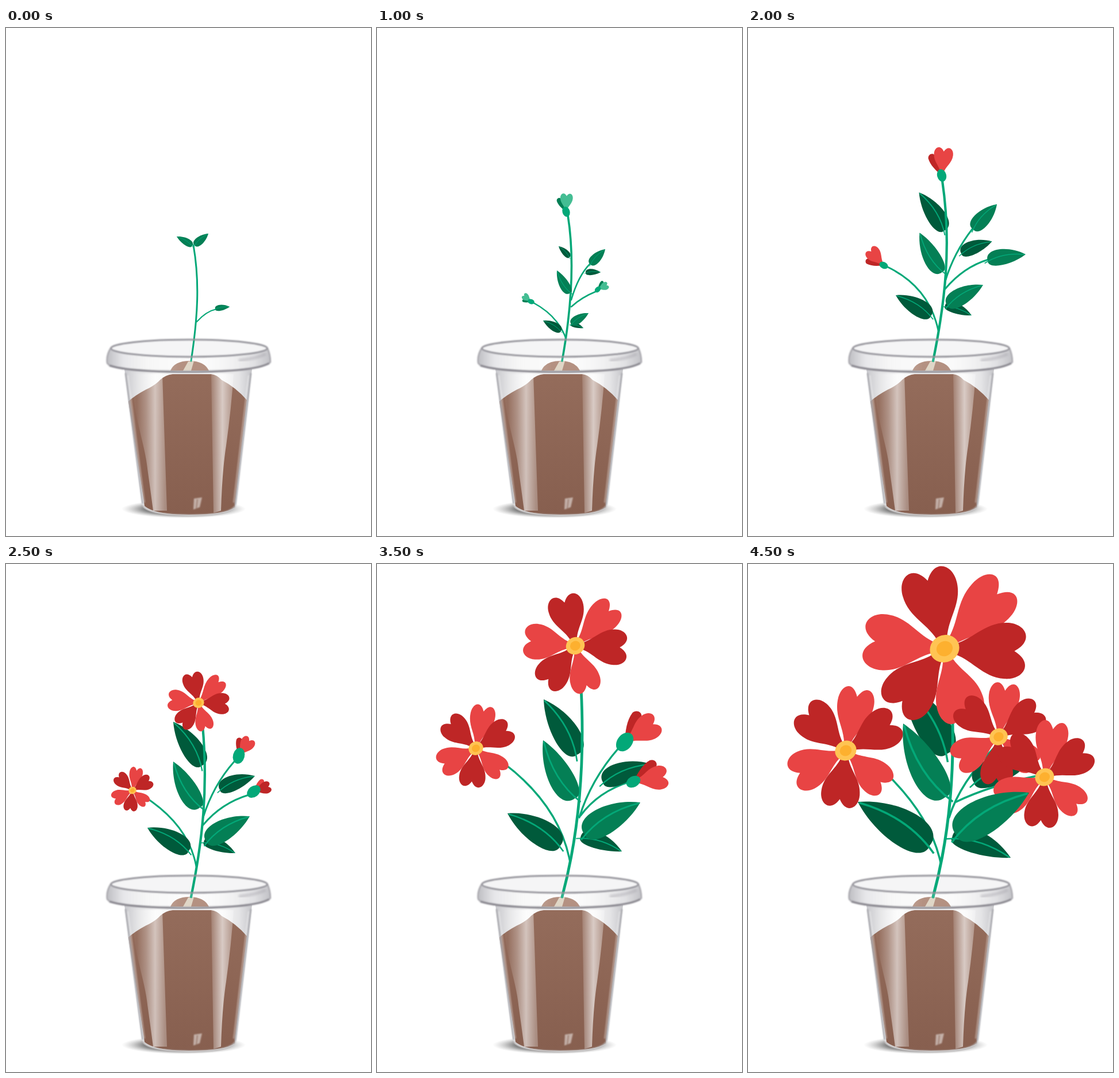
An HTML page that plays this animation: 635 px wide and 882 px high, repeating every 5 s.

```html
<!DOCTYPE html>
<html lang="en">
<head>
<meta charset="utf-8">
<title>Growing flower</title>
<style>
  html, body { margin: 0; width: 100%; height: 100%; overflow: hidden; background: #fff; }
  svg { display: block; width: 100%; height: 100%; }
</style>
</head>
<body>
<svg viewBox="0 0 635 882">
  <defs>
    <filter id="soft"><feGaussianBlur stdDeviation=".8"/></filter>
    <filter id="softer"><feGaussianBlur stdDeviation="2"/></filter>
    <radialGradient id="shadow">
      <stop offset=".6" stop-color="#444" stop-opacity=".75"/>
      <stop offset=".8" stop-color="#666" stop-opacity=".35"/>
      <stop offset="1" stop-color="#999" stop-opacity="0"/>
    </radialGradient>
    <linearGradient id="wall">
      <stop offset="0" stop-color="#c9c9cd"/>
      <stop offset=".1" stop-color="#e2e2e4"/>
      <stop offset=".25" stop-color="#f8f8f8"/>
      <stop offset=".75" stop-color="#f8f8f8"/>
      <stop offset=".9" stop-color="#e4e4e6"/>
      <stop offset="1" stop-color="#c6c6ca"/>
    </linearGradient>
    <linearGradient id="soil" x2="0" y2="1">
      <stop offset="0" stop-color="#946c5b"/>
      <stop offset="1" stop-color="#875f4f"/>
    </linearGradient>
    <linearGradient id="shineL" gradientUnits="userSpaceOnUse" x1="222" x2="277" y1="0" y2="0">
      <stop offset=".1" stop-color="#fff" stop-opacity=".04"/>
      <stop offset=".4" stop-color="#fff" stop-opacity=".28"/>
      <stop offset=".68" stop-color="#fff" stop-opacity=".6"/>
      <stop offset="1" stop-color="#fff" stop-opacity=".28"/>
    </linearGradient>
    <linearGradient id="shineR" gradientUnits="userSpaceOnUse" x1="356" x2="397" y1="0" y2="0">
      <stop offset="0" stop-color="#fff" stop-opacity=".12"/>
      <stop offset=".5" stop-color="#fff" stop-opacity=".65"/>
      <stop offset="1" stop-color="#fff" stop-opacity=".25"/>
    </linearGradient>
    <linearGradient id="band">
      <stop offset="0" stop-color="#a8a8ae" stop-opacity=".75"/>
      <stop offset=".1" stop-color="#dcdce0" stop-opacity=".7"/>
      <stop offset=".25" stop-color="#eee" stop-opacity=".5"/>
      <stop offset=".45" stop-color="#eee" stop-opacity=".18"/>
      <stop offset=".6" stop-color="#eee" stop-opacity=".18"/>
      <stop offset=".9" stop-color="#d4d4d8" stop-opacity=".7"/>
      <stop offset="1" stop-color="#acacb2" stop-opacity=".75"/>
    </linearGradient>
  </defs>

  <ellipse cx="309" cy="835" rx="108" ry="16" fill="url(#shadow)"/>
  <path d="M206 592L236 826Q239 846 318 847Q398 846 400 828L428 592Z" fill="url(#wall)"/>
  <path d="M213 648Q226 637 243 628Q260 620 268 611Q278 602 290 601H357Q367 602 375 611Q400 624 419 646L398 832Q382 845 318 845Q258 845 241 830Z" fill="url(#soil)"/>
  <ellipse cx="318.500" cy="556" rx="136" ry="15" fill="#f5f5f6"/>
  <path d="M286 595Q293 578 319 578Q345 578 353 595Z" fill="#a87d6a"/>
  <path d="M317 579L327 578L322 595H308Z" fill="#ddd2bf"/>

  <g id="plant"></g>

  <g fill="none">
    <path d="M222 601C216 660 242 720 246 765Q251 800 256 838H280L272 601Z" fill="url(#shineL)"/>
    <path d="M357 601L361 842L374 838Q376 770 383 725Q392 660 396 601Z" fill="url(#shineR)"/>
    <g filter="url(#soft)">
      <path d="M327 817L341 815L337 832L326 836Z" fill="#fff" fill-opacity=".5"/>
      <path d="M333 818L331 835" stroke="#8b6353" stroke-width="3" stroke-opacity=".5"/>
      <path d="M208 599L238 826M426 599L399 828" stroke="#b0b0b5" stroke-width="3"/>
      <path d="M212 603L241 824M422 603L396 824" stroke="#fff" stroke-width="2" stroke-opacity=".4"/>
      <path d="M237 828Q246 846 318 846Q391 846 399 829" stroke="#b5b1b1" stroke-width="2.5"/>
      <path d="M182 556C176 565 175 575 176 582C190 594 250 599 318 599C390 599 450 592 460 580Q460 567 455 556C450 566 390 571 318 571C250 571 186 566 182 556Z" fill="url(#band)"/>
      <path d="M180 586C205 594 250 597 318 597C390 597 440 592 458 582" stroke="#8b8991" stroke-width="3.500"/>
      <path d="M182 556C176 565 175 575 176 582L180 586M455 556Q460 567 460 580L458 582" stroke="#aaa9af" stroke-width="2.500"/>
      <ellipse cx="318.500" cy="556" rx="136" ry="15" stroke="#95949b" stroke-width="3"/>
    </g>
    <path d="M405 577Q435 574 452 566" stroke="#a5a4aa" stroke-width="4" stroke-opacity=".6" filter="url(#softer)"/>
  </g>
</svg>
<script>
const STEM = '#03a878', DARK = '#005a3b', MID = '#047f55', PALE = '#44bd93';
const RED = '#e84444', CRIMSON = '#be2626';
const STEP = 500;

const HEART = 'M.08-.05C.34-.11 .46-.33 .74-.34C.97-.35 1.1-.14 .85 0C1.1 .14 .97 .35 .74 .34C.46 .33 .34 .11 .08 .05Z';
const DROP = 'M0 0C.3-.12 .6-.22 .88-.16C1.03-.1 1.03 .1 .88 .14C.6 .2 .3 .1 0 0Z';
// angle, length and width of each petal
const PETALS = [[-104, 1, 1], [-46, 1.08, .9], [2, 1, 1], [74, .92, .85], [129, .96, .95], [186, 1, 1]];

// colour and bulge on either side of the midrib
const LEAVES = {
  leaf1: [DARK, .24, .3], leaf6: [DARK, .33, .23], leaf3: [DARK, .26, .31], leaf5: [DARK, .33, .17],
  leaf7: [MID, .31, .3], leaf8: [MID, .32, .23], topL: [MID, .24, .3], topR: [MID, .31, .3],
  leaf2: [MID, .3, .21], leaf4: [MID, .32, .25], leafL: [DARK, .24, .3]
};

const place = (x, y, angle, sx, sy, path, fill) =>
  `<path transform="translate(${x} ${y}) rotate(${angle}) scale(${sx} ${sy})" d="${path}" fill="${fill}"/>`;

const line = (d, width) =>
  `<path d="${d}" fill="none" stroke="${STEM}" stroke-width="${width}" stroke-linecap="round"/>`;

const branch = ([x, y, cx, cy, ex, ey], width) => line(`M${x} ${y}Q${cx} ${cy} ${ex} ${ey}`, width);

const stem = ([ax, ay, bx, by, ex, ey], width) => line(`M322 578C${ax} ${ay} ${bx} ${by} ${ex} ${ey}`, width);

function leaf(key, [x, y, tx, ty]) {
  const [fill, a, b] = LEAVES[key];
  const size = Math.hypot(tx - x, ty - y);
  const angle = Math.atan2(ty - y, tx - x) * 180 / Math.PI;
  const blade = `M0 0C-.05 ${-a} .57 ${-a} 1 0C.57 ${b} -.05 ${b} 0 0Z`;
  const bow = .16 * Math.sign(b - a);
  return place(x, y, angle, size, size, blade, fill) +
    `<path transform="translate(${x} ${y}) rotate(${angle}) scale(${size})" d="M-.09 ${-bow / 3}Q.4 ${bow} .98 0"
      fill="none" stroke="${STEM}" stroke-width="${Math.max(.8, size * .024) / size}"/>`;
}

function bud([x, y, angle, size, calyx], light, dark) {
  return place(x, y, angle - 33, size * .86, size * .86, DROP, dark) +
    place(x, y, angle, size, size, HEART, light) +
    `<ellipse transform="translate(${x} ${y}) rotate(${angle - 20})" rx="${calyx}" ry="${calyx * .72}" fill="${STEM}"/>`;
}

function bloom([x, y, r, turn]) {
  const petals = PETALS.map(([angle, long, wide], i) =>
    place(x, y, angle + turn, r * long, r * wide, HEART, i % 2 ? RED : CRIMSON)).join('');
  const disc = (size, fill) =>
    `<ellipse transform="translate(${x} ${y}) rotate(-25)" rx="${r * size}" ry="${r * size * .9}" fill="${fill}"/>`;
  return petals + disc(.182, '#ffc453') + disc(.1, '#fdb02f');
}

// blends the parts two poses have in common
function mix(a, b, k) {
  const out = {};
  for (const key in a) {
    if (!(key in b)) continue;
    out[key] = Array.isArray(a[key]) ? a[key].map((v, i) => v + (b[key][i] - v) * k) : a[key];
  }
  return out;
}

const sprout = {
  width: 3, stem: [334, 500, 337, 440, 326, 377],
  right2: [332, 510, 348, 492, 366, 488], leaf8: [364, 488, 389, 484],
  topL: [324, 378, 297, 362], topR: [328, 377, 352, 357]
};

const young = {
  width: 3.3, stem: [338, 490, 344, 400, 332, 313],
  left: [329, 540, 315, 500, 275, 479], right1: [338, 472, 350, 430, 369, 411], right2: [338, 484, 355, 468, 378, 457],
  topL: [331, 313, 306, 298], topR: [333, 312, 357, 293],
  leaf2: [337, 461, 318, 430], leaf3: [321, 528, 298, 513], leaf4: [337, 515, 359, 501],
  leaf7: [368, 412, 388, 391], leaf8: [376, 457, 400, 452], leafL: [276, 480, 253, 466]
};

const budding = {
  width: 3.6, light: PALE, dark: MID, stem: [338, 490, 344, 400, 332, 325],
  left: [329, 540, 315, 500, 272, 477], right1: [338, 472, 350, 430, 371, 409], right2: [338, 484, 355, 468, 382, 457],
  leaf1: [335, 398, 316, 379], leaf2: [336, 460, 313, 421], leaf3: [320, 526, 289, 508],
  leaf4: [338, 514, 368, 495], leaf5: [337, 515, 359, 521], leaf6: [363, 425, 389, 424], leaf7: [371, 410, 397, 384],
  budTop: [329, 319, -88, 32, 9], budL: [268, 475, -140, 18, 6], budR: [384, 454, -25, 20, 6]
};

const reddening = {
  width: 4.2, light: RED, dark: CRIMSON, stem: [342, 480, 355, 380, 338, 265],
  left: [331, 525, 315, 450, 243, 415], right1: [343, 440, 358, 390, 391, 348], right2: [343, 453, 375, 415, 418, 402],
  leaf1: [343, 353, 304, 297], leaf2: [338, 425, 306, 368], leaf3: [319, 501, 268, 470],
  leaf4: [345, 481, 394, 454], leaf5: [341, 483, 379, 496], leaf6: [370, 391, 416, 373],
  leaf7: [391, 349, 429, 311], leaf8: [417, 404, 475, 395],
  budTop: [336, 257, -85, 41, 10], budL: [237, 413, -132, 31, 7]
};

const opening = {
  width: 4.2, light: RED, dark: CRIMSON, stem: [342, 480, 352, 390, 342, 280],
  left: [331, 525, 318, 455, 244, 406], right1: [343, 440, 360, 385, 397, 343], right2: [343, 453, 375, 415, 422, 401],
  leaf1: [341, 350, 291, 274], leaf2: [337, 423, 291, 343], leaf3: [318, 498, 246, 458],
  leaf4: [349, 482, 424, 438], leaf5: [344, 483, 399, 502], leaf6: [372, 392, 433, 368],
  budR: [405, 333, -55, 37, 14], budLow: [431, 395, -18, 31, 13],
  bloom1: [335, 241, 54, 0], bloom2: [220, 393, 38, -32]
};

const flowering = {
  width: 4.8, light: RED, dark: CRIMSON, stem: [351, 470, 362, 350, 355, 215],
  left: [336, 518, 318, 420, 222, 347], right1: [352, 440, 372, 375, 420, 320], right2: [354, 437, 385, 395, 440, 378],
  leaf1: [348, 331, 290, 235], leaf2: [344, 407, 289, 306], leaf3: [319, 489, 227, 433],
  leaf4: [361, 469, 458, 414], leaf5: [354, 475, 426, 499], leaf6: [393, 379, 476, 347],
  budR: [431, 309, -32, 68, 18], budLow: [446, 378, -9, 61, 13],
  bloom1: [345, 142, 91, 0], bloom2: [172, 320, 71, -32]
};

const lush = {
  ...flowering, width: 5, stem: [351, 470, 360, 360, 355, 245],
  left: [335, 518, 318, 440, 240, 363],
  leaf1: [347, 329, 270, 208], leaf2: [343, 405, 270, 277], leaf3: [316, 489, 191, 413],
  leaf4: [362, 470, 489, 397], leaf5: [355, 475, 457, 510], leaf6: [393, 379, 496, 338],
  budR: [429, 309, -32, 104, 18], budLow: [445, 378, -10, 77, 13],
  bloom1: [342, 144, 122, 0], bloom2: [170, 321, 96, -32]
};

const { budR, budLow, ...leafy } = lush;
const full = {
  ...leafy, left: [335, 518, 318, 440, 244, 367],
  right1: [350, 440, 368, 380, 432, 315], right2: [362, 413, 420, 385, 502, 368],
  bloom1: [342, 147, 143, 0], bloom2: [170, 324, 104, -32],
  bloom3: [436, 300, 88, -36], bloom4: [516, 370, 92, -34]
};

const swelling = {
  ...reddening, ...mix(reddening, opening, .5), stem: reddening.stem,
  left: reddening.left, right1: reddening.right1, right2: reddening.right2,
  leaf7: [391, 349, 433, 306], leaf8: [417, 404, 483, 393],
  budTop: [337, 256, -85, 49, 11], budL: [236, 412, -132, 38, 8]
};

const poses = [sprout, young, budding, reddening, swelling, opening,
  mix(opening, flowering, .62), flowering, lush, full];

function draw(pose) {
  const each = (keys, paint) => keys.split(' ').filter(k => pose[k]).map(k => paint(pose[k], k)).join('');
  const paintLeaf = (value, key) => leaf(key, value);
  return each('left right1 right2', v => branch(v, pose.width * .7)) +
    each('leaf1 leaf6 leaf3 leaf5 leaf7 leaf8 leafL', paintLeaf) +
    stem(pose.stem, pose.width) +
    each('topL topR', paintLeaf) +
    each('budTop budL budR', v => bud(v, pose.light, pose.dark)) +
    each('budLow', v => pose === opening ? bud(v, CRIMSON, RED) : bud(v, RED, CRIMSON)) +
    each('bloom1 bloom2 bloom3 bloom4', bloom) +
    each('leaf2 leaf4', paintLeaf);
}

const plant = document.getElementById('plant');
plant.innerHTML = poses.map(pose => `<g visibility="hidden">${draw(pose)}</g>`).join('');
const layers = [...plant.children];
const start = performance.now();
let shown = -1;

function tick() {
  const index = Math.floor((performance.now() - start) / STEP) % layers.length;
  if (index !== shown) {
    layers.forEach((layer, i) => layer.setAttribute('visibility', i === index ? 'visible' : 'hidden'));
    shown = index;
  }
  requestAnimationFrame(tick);
}
tick();
</script>
</body>
</html>
```
